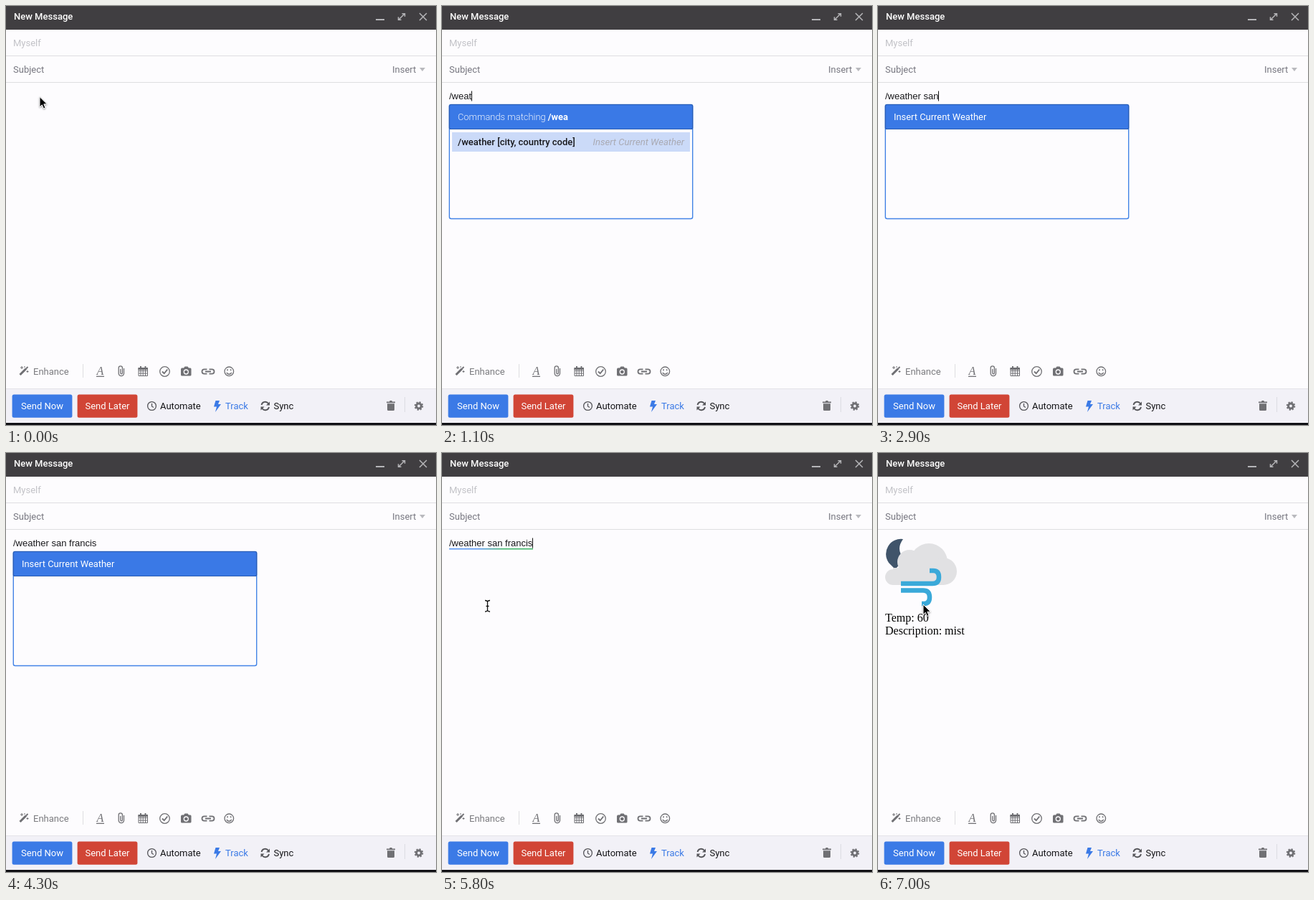
An HTML page for the animation above (7100 ms loop, 600 by 584 pixels).

```html
<!DOCTYPE html>
<html lang="en">
<head>
<meta charset="utf-8">
<title>New Message</title>
<style>
html, body { margin: 0; width: 100%; height: 100%; overflow: hidden; background: #fdfcfe; }
svg { display: block; }
text { font: 13px Roboto, sans-serif; white-space: pre; }
.medium { font-weight: 500; }
.hint { font-style: italic; font-size: 13.1px; fill: #a9a9b2; text-anchor: end; }
.heading { font-size: 12.9px; }
.draft { font-family: "Liberation Sans", Arial, sans-serif; }
.result { font: 16px "Liberation Serif", Times, serif; }
.line { fill: none; stroke: #707074; stroke-width: 1.3; }
.thin { stroke-width: 1; }
.thick { stroke-width: 1.8; }
.dark { stroke: #555559; }
.solid { fill: #707074; }
</style>
</head>
<body>
<svg width="600" height="584" viewBox="0 0 600 584">
  <defs>
    <linearGradient id="progress"><stop offset=".35" stop-color="#4a8df0"/><stop offset=".65" stop-color="#2fae5c"/></linearGradient>
    <g id="weatherIcon">
      <path d="M25 2A21 21 0 0 0 5 35L14 44 27 30Q14 17 25 2Z" fill="#40546a"/>
      <g fill="#e1e1e3">
        <circle cx="61" cy="34" r="26"/><circle cx="34" cy="34" r="17"/>
        <circle cx="81" cy="47" r="19"/><circle cx="11" cy="55" r="11"/>
        <rect x="11" y="42" width="70" height="24"/>
      </g>
      <path d="M22 64H66Q75 64 75 55Q75 46 67 46H62M22 73.500H53Q62 73.500 62 83Q62 92 54 92H51" fill="none" stroke="#3aa9d9" stroke-width="6.500"/>
    </g>
  </defs>

  <rect width="600" height="584" fill="#fdfcfe"/>
  <rect width="600" height="33" fill="#403e41"/>
  <text class="medium" x="11" y="19" fill="#fff">New Message</text>
  <g fill="none" stroke="#b5b5b8" stroke-width="1.500">
    <path d="M516 19H528" stroke-width="2"/>
    <path d="M577 10L587 20M587 10L577 20"/>
    <path d="M548 19L556 11M552.500 10.700H556.500V14.700M547.500 15.300V19.300H551.500"/>
  </g>
  <path d="M0 69.500H600M0 106.500H600" stroke="#dedee1"/>
  <text x="10" y="56" fill="#c2c2c7">Myself</text>
  <text x="10" y="93" fill="#777780">Subject</text>
  <text x="539" y="93" fill="#777780">Insert</text>
  <path d="M577 86H585L581 91Z" fill="#b9b9be"/>

  <g id="toolbar">
    <g transform="translate(25 508)">
      <path d="M-5.500 6L3 -2.500" stroke="#707074" stroke-width="3"/>
      <path d="M3 -2.500L5.500 -5" class="line thick"/>
      <path d="M-3 -6V-2M-5 -4H-1M1 -6V-4M5 0V3M3.500 1.500H6.500" class="line thin"/>
    </g>
    <text x="38" y="514" fill="#7b7b7f">Enhance</text>
    <path d="M107.500 499V518" stroke="#dedee1"/>
    <text class="solid" x="126.500" y="514" style="font:italic 16px 'Liberation Serif',serif">A</text>
    <path d="M126 516.300H137" class="line"/>
    <path d="M164.500 505V512.500A3.700 3.700 0 0 1 157.200 512.500V504.500A2.500 2.500 0 0 1 162.400 504.500V511.500A1.200 1.200 0 0 1 159.800 511.500V506" class="line"/>
    <path d="M185 504.500H197.500V515.500H185ZM185 508.500H197.500M185 512H197.500M188 507V515.500M191.200 507V515.500M194.500 507V515.500" class="line thin"/>
    <path d="M184.500 504H198V507H184.500ZM187 502H189V505H187ZM193.500 502H195.500V505H193.500Z" class="solid"/>
    <circle cx="221.500" cy="509.500" r="6.800" class="line"/>
    <path d="M218 509.500L220.700 512.200L225.300 506.500" class="line thick"/>
    <path d="M245 504.500H248L249.500 502.500H253.500L255 504.500H257A1.500 1.500 0 0 1 258.500 506V514A1.500 1.500 0 0 1 257 515.500H245.500A1.500 1.500 0 0 1 244 514V506Z" class="solid"/>
    <circle cx="251.300" cy="510" r="3" fill="none" stroke="#fdfcfe" stroke-width="1.300"/>
    <path d="M280.500 506.300H276.700A3.200 3.200 0 0 0 276.700 512.700H280.500M283.500 506.300H287.300A3.200 3.200 0 0 1 287.300 512.700H283.500M278 509.500H286" class="line thick"/>
    <circle cx="311.300" cy="509.300" r="6.300" class="line"/>
    <path d="M307.800 511Q311.300 515.500 314.800 511" class="line"/>
    <circle cx="309" cy="507.300" r="1" class="solid"/><circle cx="313.600" cy="507.300" r="1" class="solid"/>
  </g>

  <rect y="533" width="600" height="48" fill="#f2f1f7"/>
  <path d="M0 533.500H600" stroke="#e4e4e9"/>
  <rect y="581" width="600" height="3" fill="#101014"/>
  <rect x="8.600" y="541.600" width="83.800" height="32.200" rx="2.500" fill="#3b7ae6"/>
  <rect x="99.600" y="541.600" width="83.800" height="32.200" rx="2.500" fill="#d14536"/>
  <g class="medium" fill="#fff" text-anchor="middle">
    <text x="50.500" y="562">Send Now</text>
    <text x="141.500" y="562">Send Later</text>
  </g>
  <circle cx="203.500" cy="557.500" r="5.900" class="line dark"/>
  <path d="M203.500 554V558L206 559.500" class="line dark"/>
  <text x="215" y="562" fill="#151518">Automate</text>
  <path d="M292.500 550H298L296 555H300L292 566L294 558.500H290Z" fill="#3b7ae6"/>
  <text x="306" y="562" fill="#3b7ae6">Track</text>
  <path d="M356.500 556A5.300 5.300 0 0 1 366 554M367 559A5.300 5.300 0 0 1 357.500 561" class="line dark thick"/>
  <path d="M368 551.500V556.500H363ZM355.500 563.500V558.500H360.500Z" fill="#555559"/>
  <text x="373.500" y="562" fill="#151518">Sync</text>
  <path d="M531 551.500H535L535.700 550H538.300L539 551.500H543V553.300H531ZM532 554.300H542V562.500A1.500 1.500 0 0 1 540.500 564H533.500A1.500 1.500 0 0 1 532 562.500Z" class="solid"/>
  <path d="M556.500 545V566" stroke="#dcdce2"/>
  <g fill="none" stroke="#707074">
    <circle cx="576" cy="557.500" r="3.400" stroke-width="3"/>
    <circle cx="576" cy="557.500" r="5.300" stroke-width="2" stroke-dasharray="2.080"/>
  </g>

  <g id="draft">
    <text id="typed" class="draft" x="10" y="130" fill="#18181b"></text>
    <path id="caret" d="M0 118.500V132.500" stroke="#111"/>
    <rect id="underline" x="10" y="133" width="117" height="1.400" fill="url(#progress)"/>
  </g>

  <g id="popup">
    <rect id="frame" x="10.300" y="137.500" width="339.400" rx="2.500" fill="#fdfcfe" stroke="#4384e6" stroke-width="1.400"/>
    <rect x="10.300" y="137.500" width="339.400" height="34" rx="2" fill="#3a79e6" stroke="#285bb2" stroke-width="1.200"/>
    <text id="matching" class="heading" x="22" y="159" fill="#fff"><tspan font-weight="300" fill-opacity=".9">Commands matching </tspan><tspan id="query" font-weight="700"></tspan></text>
    <text id="heading" class="heading" x="22" y="159" fill="#fff">Insert Current Weather</text>
    <rect id="selection" x="14" y="176" width="332" fill="#cbdaf8"/>
    <g id="commands"></g>
    <g id="match"></g>
    <g id="city">
      <use href="#weatherIcon" transform="translate(22 180.300) scale(.5)"/>
      <text class="medium" x="75" y="230" fill="#18181b">San Francisco, US</text>
    </g>
  </g>

  <g id="inserted">
    <use href="#weatherIcon" x="10" y="118"/>
    <text class="result" x="10" y="235">Temp: 60</text>
    <text class="result" x="10" y="253">Description: mist</text>
  </g>

  <path id="arrow" d="M0 0V14.300L3.300 11.300L5.600 16.500L8 15.500L5.800 10.300H10.300Z" stroke="#fff" style="filter:drop-shadow(0 1px 1px #0006)"/>
  <path id="beam" d="M60 205.500Q63.500 205.500 63.500 208V218.500Q63.500 221 60 221M67 205.500Q63.500 205.500 63.500 208M67 221Q63.500 221 63.500 218.500M61.500 213.500H65.500" fill="none" stroke="#111" stroke-width="1.300"/>
</svg>
<script>
const LOOP = 7100, STEP = 100;
const $ = id => document.getElementById(id);
const show = (id, on) => { $(id).style.display = on ? "" : "none"; };

const commands = [
  ["availability", "Launch Share Availability"],
  ["badge", "Launch Social Badges"],
  ["button", "Launch Call to Action"],
  ["cal", "Launch Share Availability"],
  ["cal [time]", "Insert Availability"],
  ["calltoaction", "Launch Call to Action"],
  ["code", "Launch Formatted Code"],
  ["crestloom", "Launch Crestloom"],
  ["cta", "Launch Call to Action"],
  ["event", "Launch Calendar Invite"],
  ["filerequest", "Launch File Request"],
  ["g [search term]", "Insert a Glomu"],
  ["gif", "Launch Lurvo"],
  ["gif [search term]", "Insert a Lurvo GIF"],
  ["glomu", "Launch Glomu"]
];
const row = ([name, hint], i) => {
  const y = 194 + 27 * i;
  return `<text class="medium" x="22" y="${y}" fill="#18181b">/${name}</text><text class="hint" x="338" y="${y}">${hint}</text>`;
};
$("commands").innerHTML = commands.map(row).join("");
$("match").innerHTML = row(["weather [city, country code]", "Insert Current Weather"], 0);

// Each burst of typing: start time, ms per key, text
const bursts = [[500, 200, "/w"], [900, 100, "eather"], [2300, 200, " san"], [3100, 100, " francis"]];
const FOUND = 4400, POINT = 4900, CLICK = 5700, INSERT = 6500;

function typedAt(t) {
  let text = "", lastKey = 0;
  for (const [start, pace, keys] of bursts) {
    if (t < start) break;
    const count = Math.min(keys.length, Math.floor((t - start) / pace) + 1);
    text += keys.slice(0, count);
    lastKey = start + (count - 1) * pace;
  }
  return { text, lastKey };
}

function draw(t) {
  const { text, lastKey } = typedAt(t);
  const query = typedAt(t - 100).text;
  const searching = query.includes(" ");
  const listing = query.length < 3;
  const found = t >= FOUND;

  show("draft", text && t < INSERT);
  $("typed").textContent = text;
  const caretX = Math.round(10 + $("typed").getComputedTextLength()) + .5;
  $("caret").setAttribute("transform", `translate(${caretX})`);
  show("caret", (t - lastKey) % 1000 < 500);
  show("underline", t >= CLICK);

  show("popup", query && t < CLICK);
  $("frame").setAttribute("height", listing ? 439 : 159);
  $("query").textContent = query;
  show("matching", !searching);
  show("heading", searching);
  show("commands", listing);
  show("match", !listing && !searching);
  show("city", found);
  show("selection", !searching || found);
  $("selection").setAttribute("height", searching ? 63 : 27);
  show("inserted", t >= INSERT);

  const move = Math.min(1, Math.max(0, (t - POINT) / 700));
  const ease = move * move * (3 - 2 * move);
  $("arrow").setAttribute("transform", `translate(${47 + 16 * move} ${126.5 + 84.5 * ease})`);
  show("arrow", t < 500 || (t >= POINT && t < CLICK) || t >= INSERT);
  show("beam", t >= CLICK && t < INSERT);
}

const begin = performance.now();
function tick() {
  const t = (performance.now() - begin) % LOOP;
  draw(Math.floor(t / STEP) * STEP);
  requestAnimationFrame(tick);
}
tick();
</script>
</body>
</html>
```
